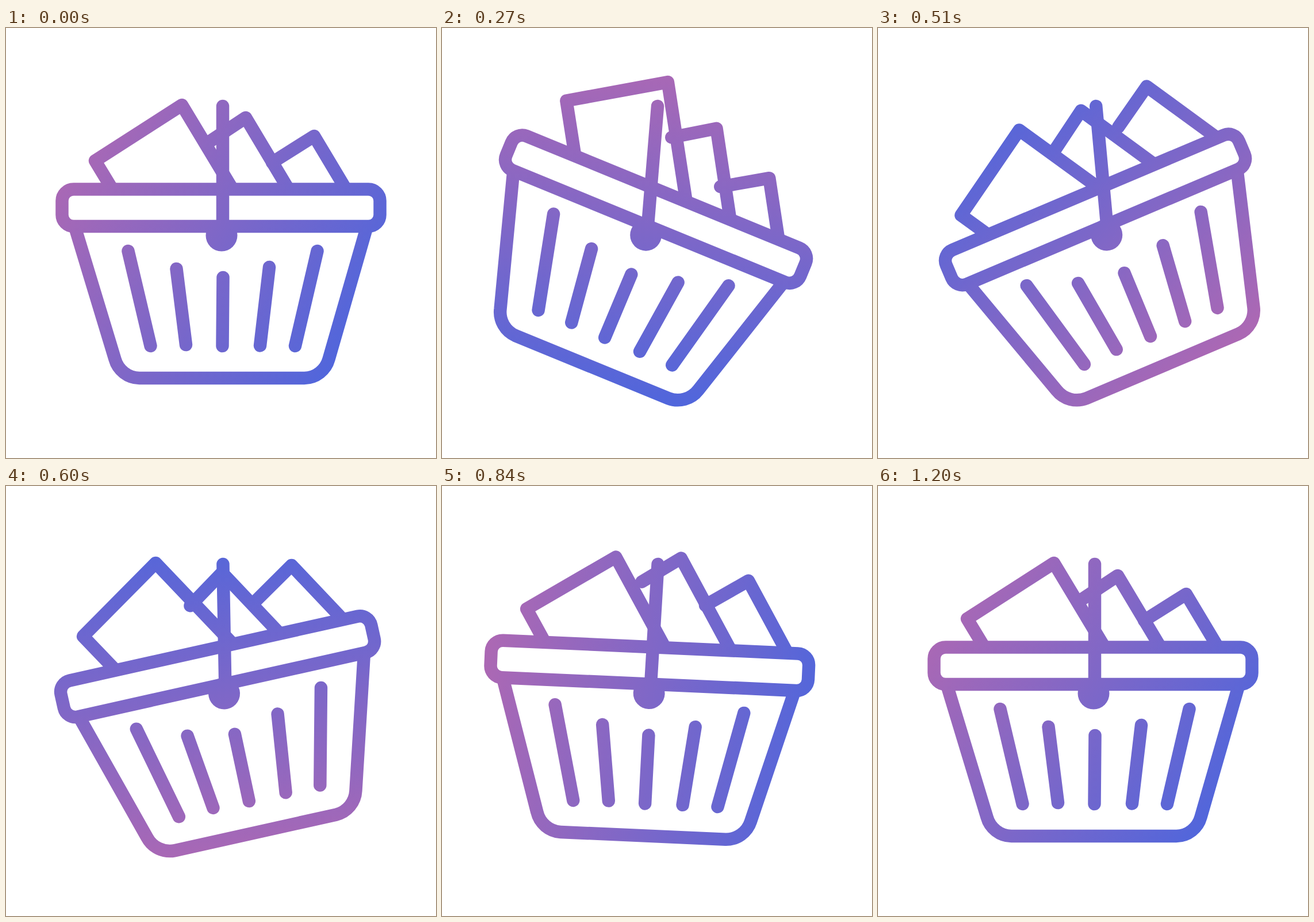
These frames come from a looping animation (748x748 px, 6.26 s). An HTML page:

```html
<!DOCTYPE html>
<html lang="en">
<head>
<meta charset="utf-8">
<title>Swinging basket</title>
<style>
  html, body { margin: 0; width: 100%; height: 100%; overflow: hidden; background: #fff; }
  svg { display: block; width: 100vw; height: 100vh; }
</style>
</head>
<body>
<svg viewBox="0 0 748 748">
  <defs>
    <linearGradient id="ink" gradientUnits="userSpaceOnUse">
      <stop offset="0" stop-color="#ab68b4"/>
      <stop offset="1" stop-color="#4f66dc"/>
    </linearGradient>
    <clipPath id="above"><rect x="-200" y="-200" width="1148" height="485"/></clipPath>
    <!-- The moving shapes form a mask, so the gradient stays in stage space. -->
    <mask id="shape" maskUnits="userSpaceOnUse" x="0" y="0" width="748" height="748">
      <g fill="none" stroke="#fff" stroke-width="22.5" stroke-linecap="round" stroke-linejoin="round">
        <g id="basket">
          <g clip-path="url(#above)">
            <path class="box" d="M215 330L155 231L306 134L424 330"/>
            <path class="box" d="M350.5 200L417 156L521 330"/>
            <path class="box" d="M463 234L536 188L621 330"/>
          </g>
          <rect x="97.5" y="280.5" width="553" height="64.5" rx="20"/>
          <path stroke-linecap="butt" d="M119.5 345L189.5 576A45 45 0 0 0 232 609H519A45 45 0 0 0 561.5 576L628 345"/>
          <path d="M212.5 388L251.5 553M296.5 419L313 551M377.5 434L376.5 553M458 416L442 552.5M541.5 388L503 553"/>
          <circle cx="375" cy="361" r="27.5" fill="#fff" stroke="none"/>
        </g>
        <path id="handle" d="M377 136V361"/>
      </g>
    </mask>
  </defs>
  <rect width="748" height="748" fill="url(#ink)" mask="url(#shape)"/>
</svg>
<script>
const LOOP = 6260, END = 1200, STEP = 30;
const PIVOT = { x: 377, y: 112 }, ARM = 248;
const CENTER = { x: 375, y: 361 }, REACH = 300;

// Each track is a list of [time, value].
const tilt = [[0, 0], [250, 23], [503, -23], [740, 6], [990, -4], [1200, 0]];
const sway = [[0, 0], [250, -21], [500, 23], [735, -25], [990, 3], [1200, 0]];
const turn = [[0, 32], [270, 91], [420, 187], [600, 268], [840, 370], [1050, 386], [1200, 392]];
const HOP = 38;
const hops = [
  [120, 312, 500, 690, 900],
  [190, 390, 580, 785, 1000],
  [298, 500, 700, 900, 1100]
].map(times => times.map((t, i) => [t, i % 2 ? HOP : 0]));

const linear = p => p;
const sine = p => (1 - Math.cos(Math.PI * p)) / 2;

function sample(track, t, ease = sine) {
  const i = track.findIndex(key => key[0] > t);
  if (i < 0) return track[track.length - 1][1];
  if (i === 0) return track[0][1];
  const [t0, a] = track[i - 1], [t1, b] = track[i];
  return a + (b - a) * ease((t - t0) / (t1 - t0));
}

const ink = document.getElementById('ink');
const basket = document.getElementById('basket');
const handle = document.getElementById('handle');
const boxes = document.querySelectorAll('.box');

function draw(t) {
  const dx = sample(sway, t);
  const swing = -Math.asin(dx / ARM);
  const dy = ARM * (Math.cos(swing) - 1);
  handle.setAttribute('transform', `rotate(${swing * 180 / Math.PI} ${PIVOT.x} ${PIVOT.y})`);
  basket.setAttribute('transform',
    `translate(${dx} ${dy}) rotate(${sample(tilt, t)} ${CENTER.x} ${CENTER.y})`);

  boxes.forEach((box, i) => {
    const lift = sample(hops[i], t);
    box.setAttribute('transform', `translate(${lift * 0.1} ${-lift})`);
  });

  const angle = sample(turn, t, linear) * Math.PI / 180;
  const gx = REACH * Math.cos(angle), gy = REACH * Math.sin(angle);
  ink.setAttribute('x1', CENTER.x - gx);
  ink.setAttribute('y1', CENTER.y - gy);
  ink.setAttribute('x2', CENTER.x + gx);
  ink.setAttribute('y2', CENTER.y + gy);
}

const start = performance.now();
function tick() {
  const t = (performance.now() - start) % LOOP;
  draw(Math.min(Math.floor(t / STEP) * STEP, END));
  requestAnimationFrame(tick);
}
tick();
</script>
</body>
</html>
```
